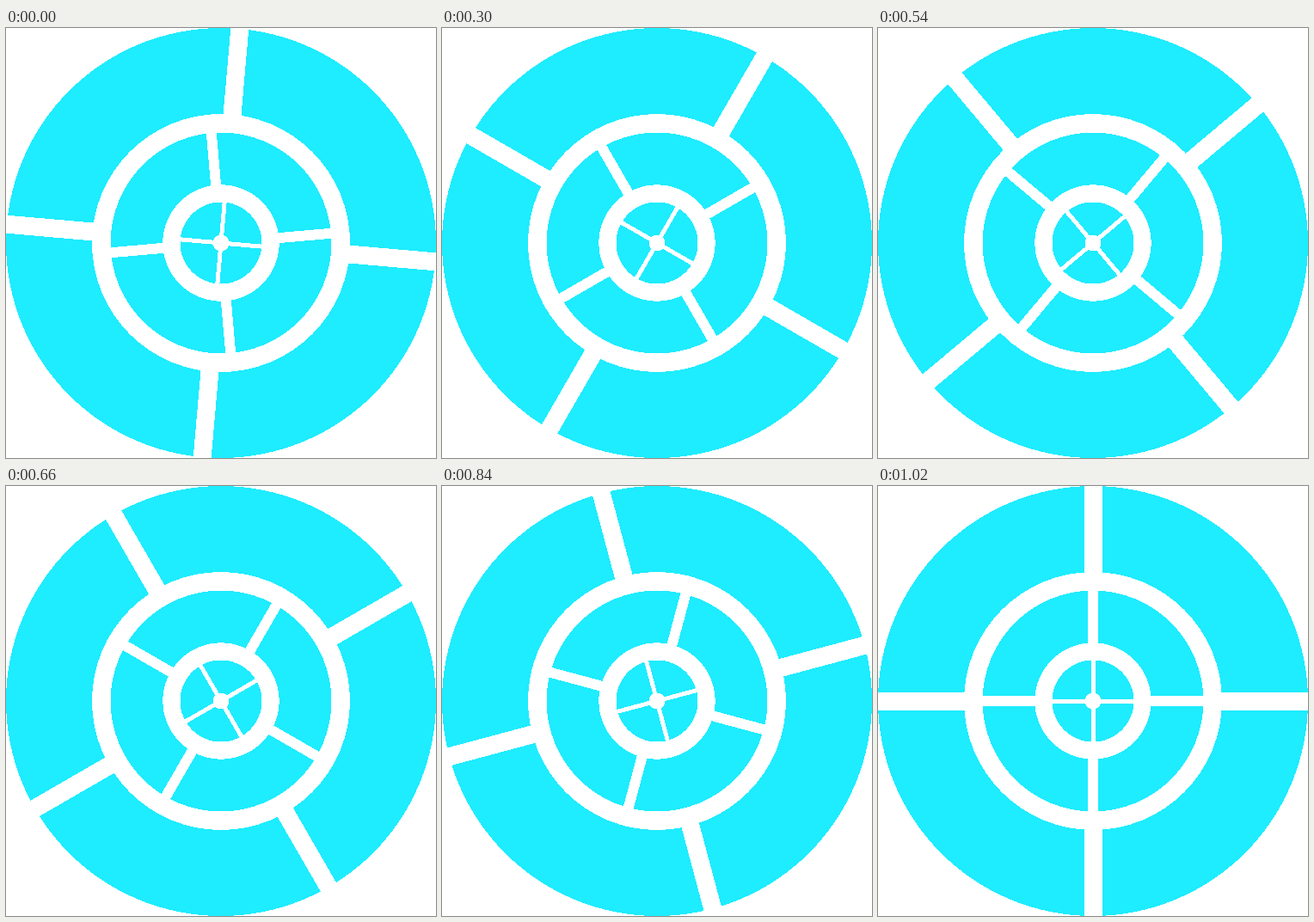
Recreate the animation shown at these times as an HTML page. Size 500x500 px, loop 1080 ms.

```html
<!DOCTYPE html>
<html lang="en">
<head>
<meta charset="utf-8">
<title>Rotating rings</title>
<style>
  html, body { margin: 0; width: 100%; height: 100%; overflow: hidden; background: #fff; }
  svg { display: block; width: 100vw; height: 100vh; }
</style>
</head>
<body>
<svg viewBox="-250 -250 500 500" shape-rendering="crispEdges"></svg>
<script>
const STEP_MS = 60, STEPS = 18, STEP_DEG = 5;
const CYAN = '#1eecff', WHITE = '#fff';
const svg = document.querySelector('svg');

// Outermost first; each disc covers the middle of the one before it.
const discs = [
  { rim: 250, radius: 250, gap: 21, turn: 1 },
  { rim: 150, radius: 128.5, gap: 12, turn: -1 },
  { rim: 67.7, radius: 47.5, gap: 5, turn: 1 }
];

const circle = (r, fill) => `<circle r="${r}" fill="${fill}"/>`;

svg.innerHTML = discs.map(({ rim, radius, gap }) =>
  circle(rim, WHITE) + circle(radius, CYAN) +
  `<path d="M-${rim} 0H${rim}M0 -${rim}V${rim}" stroke="${WHITE}" stroke-width="${gap}"/>`
).join('') + circle(9.5, WHITE);

const crosses = svg.querySelectorAll('path');
const start = performance.now();

function draw(now) {
  const step = Math.floor(Math.max(0, now - start) / STEP_MS) % STEPS;
  const angle = (step + 1) * STEP_DEG;
  discs.forEach(({ turn }, i) => crosses[i].setAttribute('transform', `rotate(${turn * angle})`));
  requestAnimationFrame(draw);
}
draw(start);
</script>
</body>
</html>
```
